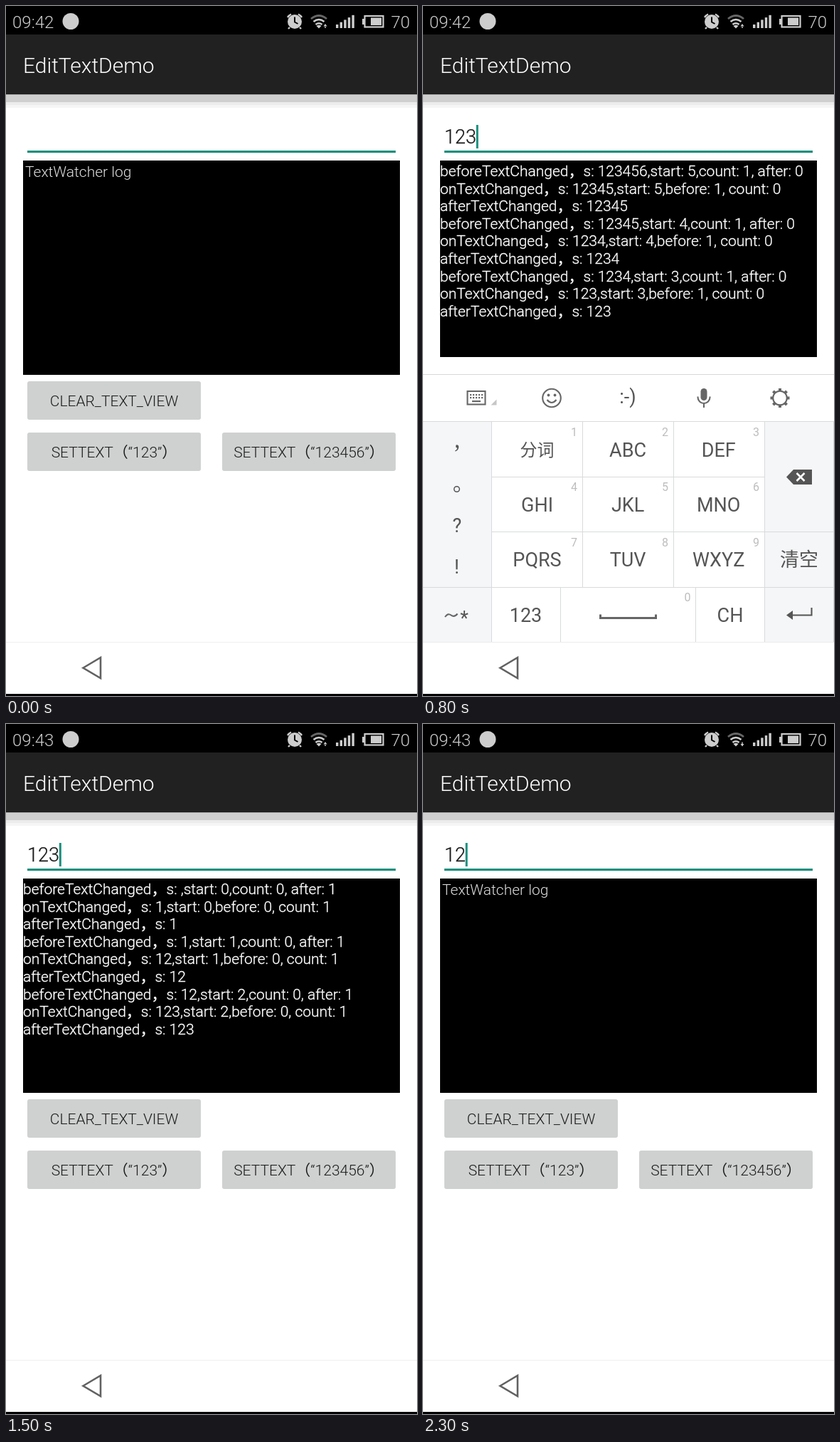
An HTML page for the animation above (2.4 s loop, 578 px wide and 969 px high).

```html
<!DOCTYPE html>
<html lang="zh-CN">
<head>
<meta charset="utf-8">
<style>
html, body { margin: 0; width: 100%; height: 100%; overflow: hidden; background: #fff; }
svg { display: block; width: 578px; height: 969px; }
text { font-family: Roboto, "Noto Sans CJK SC", "Noto Sans CJK", sans-serif; font-weight: 300; white-space: pre; }
.key { font-size: 27px; font-weight: 400; fill: #555; text-anchor: middle; }
.num { font-size: 16px; font-weight: 400; fill: #bdbdbd; text-anchor: middle; }
.btn { font-size: 21px; fill: #1c1c1c; text-anchor: middle; }
.log { font-size: 21px; fill: #fff; stroke: #fff; stroke-width: 0.35px; }
.hint { font-size: 21px; fill: #dedede; }
.icon { fill: none; stroke: #666; stroke-width: 2.1; }
#field { font-size: 27px; fill: #1a1a1a; stroke: #1a1a1a; stroke-width: 0.25px; }
</style>
</head>
<body>
<svg id="stage" viewBox="0 0 578 969"></svg>
<script>
const LOOP = 2400, STEP = 100;
const stage = document.getElementById('stage');

const rect = (x, y, w, h, fill, extra = '') =>
  `<rect x="${x}" y="${y}" width="${w}" height="${h}" fill="${fill}" ${extra}/>`;
const path = (d, extra = '') => `<path d="${d}" ${extra}/>`;
const text = (x, y, s, extra = '') => `<text x="${x}" y="${y}" ${extra}>${s}</text>`;
const button = (x, y, label) =>
  rect(x, y, 244, 54, '#cfd1d0', 'rx="3"') + text(x + 122, y + 35, label, 'class="btn"');
const range = n => [...Array(n).keys()];

function statusBar() {
  const light = '#cdcdcd';
  const bars = range(5).map(i => rect(464 + i * 5.6, 26 - i * 3.3, 3.4, 5 + i * 3.3, light)).join('');
  return rect(0, 0, 578, 40, '#000') +
    text(9, 31, '', `id="clock" font-size="24" fill="${light}"`) +
    `<circle cx="91" cy="21.5" r="11.5" fill="${light}"/>` +
    `<circle cx="406" cy="22" r="10" fill="${light}"/>` +
    path('M396 16a12 12 0 0 1 5-4.5M416 16a12 12 0 0 0-5-4.5M399 30l-2 2M413 30l2 2', `fill="none" stroke="${light}" stroke-width="2.4"`) +
    path('M406 15.5v7l4.5 2.5', 'fill="none" stroke="#000" stroke-width="2"') +
    path('M429 18q11-9 22 0', 'fill="none" stroke="#666" stroke-width="2.8"') +
    path('M432.5 22q7.5-6 15 0M435.5 26q4.5-3.5 9 0', `fill="none" stroke="${light}" stroke-width="2.6"`) +
    path('M436.5 28l3.5 3.5 3.5-3.5q-3.5-2.4-7 0z', `fill="${light}"`) +
    path('', `id="traffic" fill="${light}"`) + bars +
    rect(504.5, 14, 26, 15.5, 'none', `stroke="${light}" stroke-width="2.2"`) +
    rect(501, 18, 3, 8, light) + rect(513, 16.5, 15, 10.5, light) +
    text(541.5, 31, '70', `font-size="24" fill="${light}"`);
}

function appPage() {
  return rect(0, 40, 578, 84.5, '#212121') +
    text(24, 94, 'EditTextDemo', 'font-size="30" fill="#fff"') +
    rect(0, 124.5, 578, 10.5, '#cfcfcf') + rect(0, 135, 578, 4, '#ececec') + rect(0, 139, 578, 4, '#f5f5f5') +
    rect(30, 203, 518, 3.2, '#1b907e') +
    text(30, 193, '', 'id="field"') +
    rect(30, 167, 3, 33, '#1b907e', 'id="cursor"') +
    rect(24, 217, 530, 301, '#000', 'id="panel"') +
    '<clipPath id="panelClip"><rect id="clipBox" x="24" y="217" width="530" height="301"/></clipPath>' +
    '<g id="log" clip-path="url(#panelClip)"></g>' +
    button(30, 527, 'CLEAR_TEXT_VIEW') +
    button(30, 599, 'SETTEXT（“123”）') +
    button(304, 599, 'SETTEXT（“123456”）') +
    rect(0, 893, 578, 1, '#efefef') +
    path('M108.5 929.5L133 915v29z', 'fill="none" stroke="#616161" stroke-width="2.6"') +
    rect(0, 966, 578, 3, '#000');
}

function toolbar() {
  const dots = range(10).map(i => rect(66 + i % 5 * 4, 545 + (i / 5 | 0) * 4, 2.2, 2.2, '#666')).join('');
  const teeth = range(8).map(i =>
    `<rect x="500" y="537" width="4" height="4" fill="#666" transform="rotate(${i * 45} 502 550.5)"/>`).join('');
  return rect(0, 517, 578, 67, '#fff') + rect(0, 517, 578, 1, '#d8d8d8') +
    rect(62.5, 541, 25, 18.5, 'none', 'class="icon"') + dots + rect(69, 554, 12, 2.2, '#666') +
    path('M103.5 552.5v8h-8z', 'fill="#c6c6c6"') +
    '<circle cx="181" cy="550.5" r="12.8" class="icon"/>' +
    '<circle cx="176.5" cy="546.5" r="1.9" fill="#666"/><circle cx="185.5" cy="546.5" r="1.9" fill="#666"/>' +
    path('M174.5 553q6.5 8 13 0', 'class="icon"') +
    text(288, 558, ':-)', 'class="key"') +
    rect(390.5, 537, 9, 17, '#666', 'rx="4.5"') +
    path('M386.5 548.5v1a8.5 8.5 0 0 0 17 0v-1M395 558v6', 'class="icon"') +
    '<circle cx="502" cy="550.5" r="9.8" class="icon"/>' + teeth;
}

function keyboard() {
  const line = '#d9dadb', side = '#f5f6f8';
  const labels = ['分词', 'ABC', 'DEF', 'GHI', 'JKL', 'MNO', 'PQRS', 'TUV', 'WXYZ'];
  const keys = labels.map((label, i) => {
    const col = i % 3, row = i / 3 | 0;
    const style = i ? '' : ' style="font-size:24px;font-weight:300"';
    return text(160.5 + col * 127.6, (i ? 632.5 : 631.5) + row * 77, label, `class="key"${style}`) +
      text(212.5 + col * 128, 603.5 + row * 77.5, i + 1, 'class="num"');
  }).join('');
  const rules = rect(0, 583, 578, 1, line) + rect(0, 816, 578, 1, line) + rect(0, 893, 578, 1, '#ececec') +
    rect(96, 661, 385, 1, line) + rect(96, 738, 482, 1, line) +
    [96, 480].map(x => rect(x, 584, 1, 309, line)).join('') +
    [224, 352].map(x => rect(x, 584, 1, 232, line)).join('') +
    [193, 383].map(x => rect(x, 816, 1, 77, line)).join('') + rect(577, 584, 1, 309, line);
  return toolbar() + rect(0, 584, 578, 309, '#fff') +
    rect(0, 584, 96, 309, side) + rect(481, 584, 97, 309, side) + rules + keys +
    path('M46.5 616.5q3.5-1 3.8 2.400q0 4.500-4.800 6.600l-.5-1.100q3.200-1.600 3.200-4q-3 0-1.700-3.900z', 'fill="#555"') +
    '<circle cx="47.5" cy="678.5" r="3.8" fill="none" stroke="#555" stroke-width="1.5"/>' +
    text(48, 738.5, '?', 'class="key"') +
    text(47.5, 797, '!', 'class="key"') +
    path('M31 858q4-6 8.500-2.500t9-2', 'class="icon"') +
    text(58, 869, '*', 'class="key"') +
    text(144.5, 864.5, '123', 'class="key"') + text(432, 864.5, 'CH', 'class="key"') +
    text(372, 836, '0', 'class="num"') +
    path('M249.5 854.5v5h78v-5', 'class="icon" style="stroke-width:3"') +
    path('M511 661.5l10-10.500h26v21h-26z', 'fill="#555"') +
    path('M525.5 656l11 11m0-11l-11 11', 'stroke="#fff" stroke-width="2.6"') +
    text(529, 786.5, '清空', 'class="key" style="font-weight:300"') +
    path('M546.5 845v10.500H515', 'class="icon" style="stroke:#555"') +
    path('M511 855.5l9-6.500v13z', 'fill="#555"');
}

stage.innerHTML = statusBar() + appPage() + `<g id="keyboard">${keyboard()}</g>`;
const el = id => document.getElementById(id);

// One edit produces three watcher lines; multi-character edits replace the whole text.
function watcherLines(from, to) {
  const typed = Math.abs(from.length - to.length) === 1;
  const start = typed ? Math.min(from.length, to.length) : 0;
  const removed = from.length - start, added = to.length - start;
  return [
    `beforeTextChanged，s: ${from},start: ${start},count: ${removed}, after: ${added}`,
    `onTextChanged，s: ${to},start: ${start},before: ${removed}, count: ${added}`,
    `afterTextChanged，s: ${to}`
  ];
}

const setting = ['', '123', '123456'];
const deleting = ['123456', '12345', '1234', '123', '12', '1', ''];
const typing = ['', '1', '12', '123'];
const erasing = ['123', '12', '1', '12'];
const scene = (at, history, steps, open, cursor, down) =>
  ({ at, history: history.slice(0, steps + 1), open, cursor, down });

const scenes = [
  scene(0, setting, 0, false, false),
  scene(200, setting, 1, false, false),
  scene(400, setting, 2, false, false),
  scene(500, deleting, 0, false, false),
  scene(600, deleting, 0, true, true),
  scene(700, deleting, 1, true, true),
  scene(800, deleting, 3, true, true),
  scene(900, deleting, 5, true, true),
  scene(1000, deleting, 6, true, true),
  scene(1100, deleting, 6, false, true),
  scene(1200, typing, 0, false, true, true),
  scene(1300, typing, 0, true, true),
  scene(1400, typing, 2, true, true),
  scene(1500, typing, 3, false, true),
  scene(1600, erasing, 0, false, true),
  scene(1700, erasing, 0, true, true),
  scene(1800, erasing, 1, true, true),
  scene(1900, erasing, 2, true, true, true),
  scene(2000, erasing, 3, true, true, true),
  scene(2100, erasing, 3, false, true, true),
  scene(2300, ['12'], 0, false, true, true)
];

let shown;
function render(time) {
  const t = Math.floor(time % LOOP / STEP) * STEP;
  const now = scenes.filter(s => s.at <= t).pop();
  if (now === shown) return;
  shown = now;
  const value = now.history[now.history.length - 1];
  const lines = now.history.slice(1).flatMap((to, i) => watcherLines(now.history[i], to));
  el('clock').textContent = t < 1300 ? '09:42' : '09:43';
  el('traffic').setAttribute('d', now.down ? 'M446.5 28h5l-2.5 3.5zM448.3 25.5h1.4v3h-1.4z'
    : 'M446.5 28.5h5l-2.5-3.5zM448.3 28h1.4v3h-1.4z');
  el('field').textContent = value;
  el('cursor').setAttribute('x', 30 + Math.max(0, value.length * 15.1 - 0.5));
  el('cursor').style.display = now.cursor ? '' : 'none';
  for (const id of ['panel', 'clipBox']) el(id).setAttribute('height', now.open ? 276 : 301);
  el('log').innerHTML = lines.length
    ? lines.map((line, i) => text(24, 239 + i * 24.6, line, 'class="log"')).join('')
    : text(27, 239.5, 'TextWatcher log', 'class="hint"');
  el('keyboard').style.display = now.open ? '' : 'none';
}

const origin = performance.now();
function tick() {
  render(performance.now() - origin);
  requestAnimationFrame(tick);
}
tick();
</script>
</body>
</html>
```
